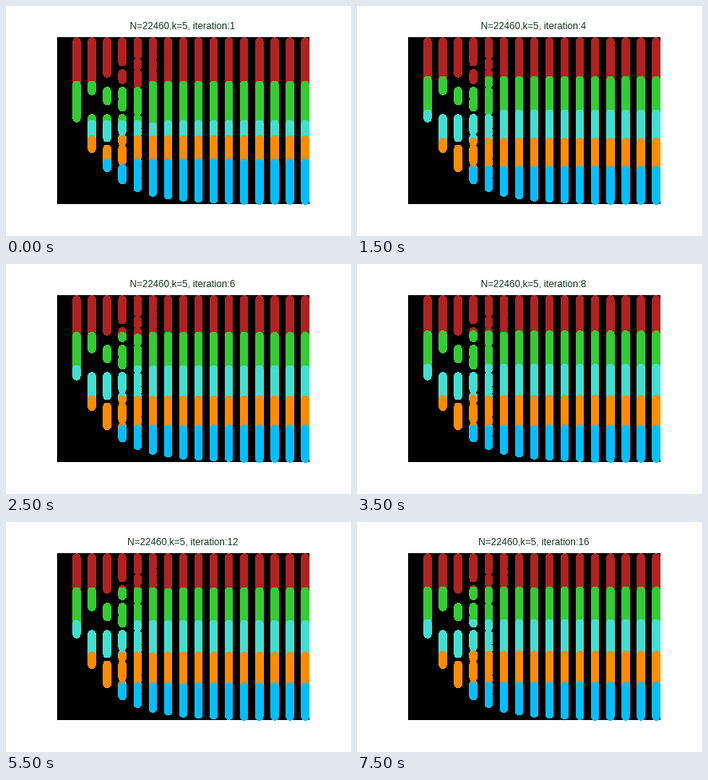
Animation of 432x288 px, one loop 8000 ms. Source, as a matplotlib script:

```python
import numpy as np
import matplotlib.pyplot as plt
from matplotlib.animation import FuncAnimation
from matplotlib.collections import LineCollection
from matplotlib.patches import Rectangle

W, H, DPI = 432, 288, 72
ITERATIONS, STEP_MS = 16, 500
COLUMNS = 16
COLORS = ["firebrick", "limegreen", "turquoise", "darkorange", "deepskyblue"]
R = 4.7                          # dot radius
TOP, BOTTOM = 44.5, 243.5        # range of dot centres
KEEP, GAIN = 0.645, 0.372        # filled share left of a run / won from a gap
START_BORDERS = [98.7, 147.7, 167, 196]


def refine(edges):
    """Next column: every run and every gap is filled from its top again."""
    size = np.diff(edges)
    share = np.where(np.arange(len(size)) % 2 == 0, KEEP, GAIN)
    share[size < 1.5] = 1        # too fine to see, leave solid
    inner = edges[:-1] + size * share
    return np.append(np.column_stack([edges[:-1], inner]).ravel(), edges[-1])


def build_columns():
    edges = np.array([TOP, TOP + 0.482 * (BOTTOM - TOP), BOTTOM])
    columns = []
    for _ in range(COLUMNS):
        columns.append(list(zip(edges[0::2], edges[1::2])))
        edges = refine(edges)
    return columns


def cluster_limits(iteration):
    """K-means on evenly spread heights, started from the first borders."""
    limits = np.array([TOP, *START_BORDERS, BOTTOM])
    for _ in range(iteration - 1):
        centres = (limits[:-1] + limits[1:]) / 2
        limits[1:-1] = (centres[:-1] + centres[1:]) / 2
    return limits


def segments(lo, hi):
    """Centre lines of all dots whose height lies between lo and hi."""
    out = []
    for x, runs in zip(xs, columns):
        for top, bottom in runs:
            a, b = max(top, lo), min(bottom, hi)
            if b >= a:
                out.append([(x, a), (x, b + 0.1)])
    return out


xs = np.linspace(88.4, 374.6, COLUMNS)
columns = build_columns()

fig = plt.figure(figsize=(W / DPI, H / DPI), dpi=DPI, facecolor="white")
ax = fig.add_axes([0, 0, 1, 1])
ax.set(xlim=(0, W), ylim=(H, 0))
ax.axis("off")
ax.add_patch(Rectangle((64, 39), 316, 209, color="black", lw=0))

bars = [ax.add_collection(
    LineCollection([], colors=c, linewidths=2 * R, capstyle="round",
                   antialiaseds=False, snap=False, zorder=2 + i),
    autolim=False) for i, c in enumerate(COLORS)]
title = ax.text(221.3, 29, "", ha="center", va="baseline", fontsize=12,
                family="Liberation Sans", color="#10351f")


def update(frame):
    iteration = frame + 1
    limits = cluster_limits(iteration)
    for bar, lo, hi in zip(bars, limits, limits[1:]):
        bar.set_segments(segments(lo, hi))
    title.set_text(f"N=22460,k=5, iteration:{iteration}")
    return [*bars, title]


anim = FuncAnimation(fig, update, frames=ITERATIONS, interval=STEP_MS,
                     repeat=True, repeat_delay=0)
plt.show()
```
